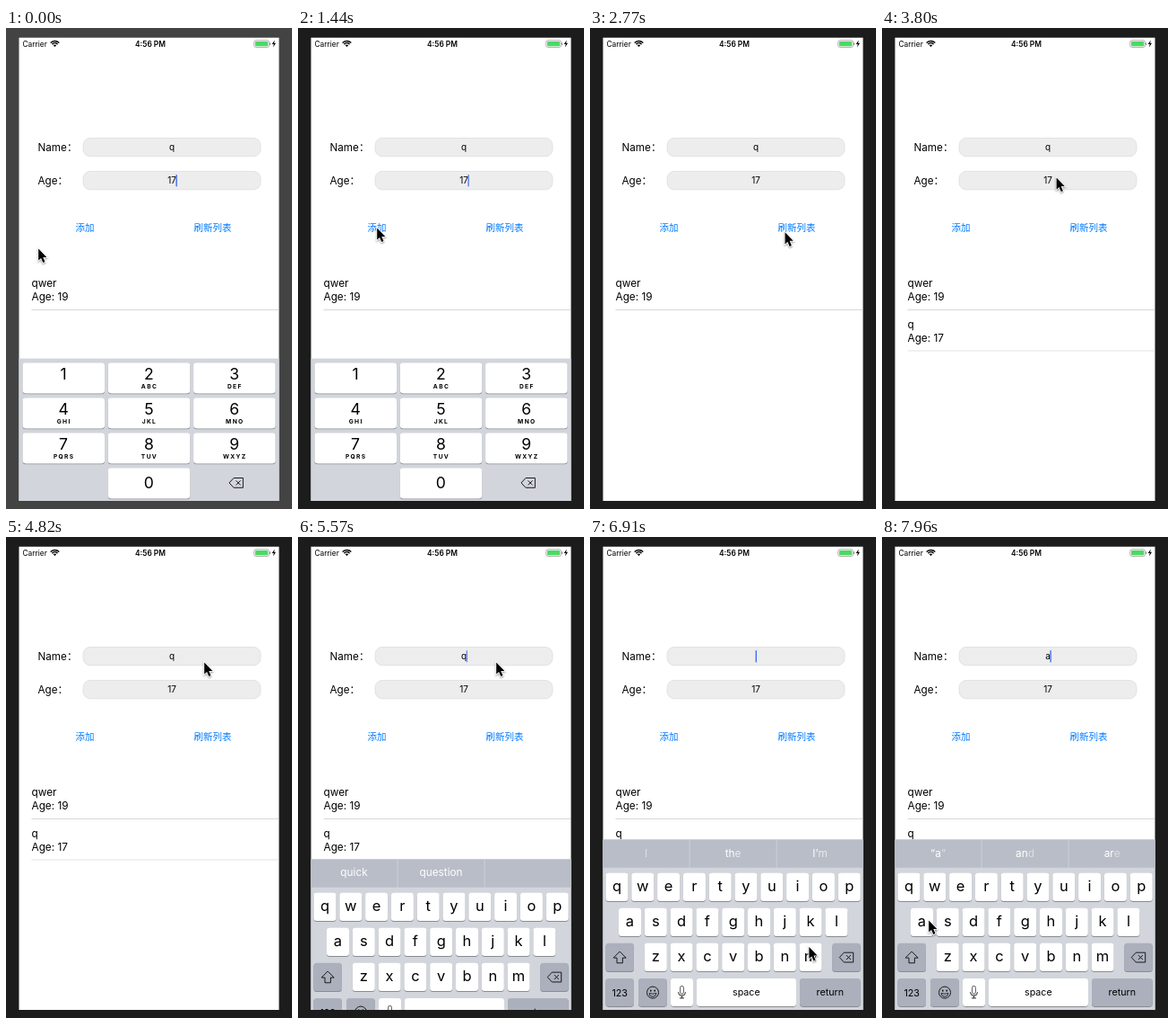
An HTML page with a canvas that plays this animation: 319x535 px, repeating every 8 s.

```html
<!DOCTYPE html>
<html lang="zh-CN">
<head>
<meta charset="utf-8">
<title>Form with list</title>
<style>
  html, body { margin: 0; width: 100%; height: 100%; overflow: hidden; background: #1c1c1c; }
  canvas { display: block; width: 319px; height: 535px; }
</style>
</head>
<body>
<canvas id="stage"></canvas>
<script>
const W = 319, H = 535, LOOP = 8000;
const canvas = document.getElementById('stage');
const dpr = window.devicePixelRatio || 1;
canvas.width = W * dpr;
canvas.height = H * dpr;
const ctx = canvas.getContext('2d');

const SANS = 'Inter, Roboto, sans-serif';
const CJK = '"Noto Sans CJK SC", "Noto Sans CJK", sans-serif';
const BLUE = '#007aff', KEY_GREY = '#abb0bc', SHADOW = '#898c91', BOARD = '#d2d5db';
const SCREEN = { x: 14.5, y: 10.8, w: 290, h: 515.2 };
const BOTTOM = SCREEN.y + SCREEN.h;
const PAD_TOP = 367.6, LETTERS_TOP = 336.5;

const clamp = v => Math.max(0, Math.min(1, v));
const easeOut = u => 1 - (1 - clamp(u)) ** 3;
const mix = (a, b, u) => a + (b - a) * u;

const BEATS = [0, 300, 1320, 1730, 2470, 3500, 4090, 4820, 5420, 5870, 6460, 6760, 7510, 7810, 7960, 8000];
function snap(t) {
  const i = BEATS.findLastIndex(b => b <= t);
  const start = BEATS[i], span = (BEATS[i + 1] ?? LOOP) - start;
  const step = span / Math.max(1, Math.round(span / 147));
  return start + Math.floor((t - start) / step + 1e-6) * step;
}

const POINTER = [
  [0, 36, 245], [200, 36, 245], [880, 88, 222], [2320, 88, 222], [2770, 219, 227],
  [3500, 219, 227], [3800, 194, 165], [4080, 206, 138], [4250, 206, 138], [4530, 205, 255],
  [4820, 221, 139], [5570, 221, 139], [5870, 267, 376], [6450, 280, 461], [6800, 280, 461],
  [7500, 52, 426], [8000, 52, 426]
];
function pointerAt(t) {
  const i = Math.max(1, POINTER.findIndex(p => p[0] > t));
  const [t0, x0, y0] = POINTER[i - 1], [t1, x1, y1] = POINTER[i];
  const u = clamp((t - t0) / (t1 - t0));
  return [mix(x0, x1, u), mix(y0, y1, u)];
}

function text(str, x, y, size, { color = '#000', align = 'left', weight = 400, font = SANS } = {}) {
  ctx.font = `${weight} ${size}px ${font}`;
  ctx.fillStyle = color;
  ctx.textAlign = align;
  ctx.fillText(str, x, y);
}

function box(x, y, w, h, r, fill, stroke) {
  ctx.beginPath();
  ctx.roundRect(x, y, w, h, r);
  if (fill) { ctx.fillStyle = fill; ctx.fill(); }
  if (stroke) { ctx.strokeStyle = stroke; ctx.lineWidth = 0.7; ctx.stroke(); }
}

function line(points, { color = '#111', width = 1, close = false, fill } = {}) {
  ctx.beginPath();
  points.forEach(([x, y]) => ctx.lineTo(x, y));
  if (close) ctx.closePath();
  if (fill) { ctx.fillStyle = fill; ctx.fill(); }
  if (width) { ctx.strokeStyle = color; ctx.lineWidth = width; ctx.stroke(); }
}

function arc(x, y, r, from, to, color = '#111', width = 1) {
  ctx.beginPath();
  ctx.arc(x, y, r, from, to);
  ctx.strokeStyle = color;
  ctx.lineWidth = width;
  ctx.stroke();
}

function at(x, y, draw) {
  ctx.save();
  ctx.translate(x, y);
  draw();
  ctx.restore();
}

// Full-width band; the screen clip trims its ends.
function band(y, h, color) {
  ctx.fillStyle = color;
  ctx.fillRect(0, y, W, h);
}

function statusBar() {
  text('Carrier', 18.5, 21, 8.4);
  text('4:56 PM', 161, 21, 8.4, { align: 'center', weight: 600 });
  at(54.5, 21, () => {
    for (const r of [6.6, 4.2]) arc(0, 0, r, -Math.PI * 0.76, -Math.PI * 0.24, '#000', 1.5);
    ctx.beginPath();
    ctx.moveTo(0, 0);
    ctx.arc(0, 0, 2.4, -Math.PI * 0.76, -Math.PI * 0.24);
    ctx.fillStyle = '#000';
    ctx.fill();
  });
  box(276.8, 13.8, 16.6, 7.6, 2, '#fff', '#8a8a8a');
  box(278, 15, 14.2, 5.2, 1, '#4cd964');
  box(294.2, 16.2, 1, 2.8, 0.5, '#8a8a8a');
  line([[299.8, 13.6], [296.6, 18], [298.7, 18], [298, 21.4], [301, 16.8], [299, 16.8]],
    { close: true, fill: '#000', width: 0 });
}

function field(label, value, y, caretAlpha) {
  text(label, 35.5, y + 15.2, 11.7);
  const labelWidth = ctx.measureText(label).width;
  text('：', 35.5 + labelWidth, y + 15, 11.5, { font: CJK });
  box(86, y + 0.4, 198, 20.4, 8, '#ededed', '#dadada');
  text(value, 185, y + 14.4, 10, { align: 'center' });
  if (caretAlpha > 0) {
    const x = 185 + ctx.measureText(value).width / 2;
    ctx.globalAlpha = caretAlpha;
    box(x - 0.4, y + 4, 1.4, 13.4, 0.7, '#426bf2');
    ctx.globalAlpha = 1;
  }
}

function row(name, age, top, lineColor) {
  text(name, 28.5, top + 20, 11.8);
  text('Age: ' + age, 28.5, top + 35.3, 11.8);
  ctx.fillStyle = lineColor;
  ctx.fillRect(28.5, top + 45, 276, 0.8);
}

function button(label, x, alpha) {
  ctx.globalAlpha = alpha;
  text(label, x, 226, 10.5, { color: BLUE, align: 'center', font: CJK });
  ctx.globalAlpha = 1;
}

function key(x, y, w, h, fill = '#fff') {
  box(x, y + 0.9, w, h, 3.3, SHADOW);
  box(x, y, w, h, 3.3, fill);
}

function deleteIcon(x, y) {
  at(x, y, () => {
    ctx.lineJoin = 'round';
    line([[-8, 0], [-3, -5.4], [7.4, -5.4], [7.4, 5.4], [-3, 5.4]], { close: true, width: 0.95 });
    line([[-0.4, -2.5], [4.6, 2.5]], { width: 0.95 });
    line([[4.6, -2.5], [-0.4, 2.5]], { width: 0.95 });
  });
}

function numberPad(top) {
  band(top, 160, BOARD);
  const letters = ['', 'ABC', 'DEF', 'GHI', 'JKL', 'MNO', 'PQRS', 'TUV', 'WXYZ'];
  letters.forEach((label, i) => {
    const x = 18.5 + (i % 3) * 95.3, y = top + 4.8 + Math.floor(i / 3) * 39;
    key(x, y, 91.5, 34);
    text(String(i + 1), x + 45.6, y + 18.2, 17.6, { align: 'center' });
    ctx.letterSpacing = '1.3px';
    text(label, x + 46.2, y + 28.6, 6.7, { align: 'center', weight: 700 });
    ctx.letterSpacing = '0px';
  });
  const y = top + 121.8;
  key(113.8, y, 91.5, 34);
  text('0', 159.4, y + 22.9, 17.6, { align: 'center' });
  deleteIcon(257, y + 16.5);
}

// Letters of each suggestion fade in one after another.
function suggestions(words, top, progress) {
  band(top, 31.3, '#b9bdc7');
  ctx.fillStyle = '#cdd0d7';
  for (const x of [110.6, 207.6]) ctx.fillRect(x, top, 1, 31.3);
  words.forEach((word, i) => {
    ctx.font = `400 11.8px ${SANS}`;
    const left = 62.5 + i * 97 - ctx.measureText(word).width / 2;
    const shown = progress * (word.length - 0.5);
    [...word].forEach((ch, j) => {
      ctx.globalAlpha = clamp(shown - j);
      text(ch, left + ctx.measureText(word.slice(0, j)).width, top + 19, 11.8, { color: '#fff' });
    });
  });
  ctx.globalAlpha = 1;
}

function letterKeys(top, deletePressed) {
  const rows = [['qwertyuiop', 17.5], ['asdfghjkl', 32], ['zxcvbnm', 60.8]];
  rows.forEach(([chars, left], r) => {
    const y = top + 37.3 + r * 39;
    [...chars].forEach((ch, i) => {
      const x = left + i * 28.8;
      key(x, y, 25, 31.3);
      text(ch, x + 12.5, y + 20.2, 16.5, { align: 'center' });
    });
  });

  const y3 = top + 115.3, y4 = top + 154.5;
  key(17.5, y3, 31.4, 31.3, KEY_GREY);
  line([[33.2, y3 + 9.2], [40.2, y3 + 16.3], [36.4, y3 + 16.3], [36.4, y3 + 22],
    [30, y3 + 22], [30, y3 + 16.3], [26.2, y3 + 16.3]], { close: true, width: 0.95 });
  key(270.3, y3, 31.4, 31.3, deletePressed ? '#fff' : KEY_GREY);
  deleteIcon(286.3, y3 + 15.8);

  key(17.5, y4, 31.4, 31, KEY_GREY);
  text('123', 33.2, y4 + 19.6, 10.8, { align: 'center' });
  key(54, y4, 31.8, 31, KEY_GREY);
  at(70, y4 + 15.6, () => {
    arc(0, 0, 6.5, 0, Math.PI * 2, '#111', 0.95);
    ctx.fillStyle = '#111';
    for (const x of [-2.2, 2.2]) {
      ctx.beginPath();
      ctx.ellipse(x, -2, 0.8, 1.2, 0, 0, Math.PI * 2);
      ctx.fill();
    }
    ctx.beginPath();
    ctx.arc(0, 0.8, 3.9, 0, Math.PI);
    ctx.quadraticCurveTo(0, 2.4, 3.9, 0.8);
    ctx.lineWidth = 0.8;
    ctx.stroke();
  });
  key(90, y4, 25, 31);
  at(102.5, y4 + 15.4, () => {
    box(-1.9, -7, 3.8, 8.8, 1.9, null, '#111');
    arc(0, -0.2, 4, 0, Math.PI, '#111', 0.9);
    line([[0, 3.8], [0, 6.5]], { width: 0.9 });
    line([[-2.4, 6.5], [2.4, 6.5]], { width: 0.9 });
  });
  key(119, y4, 111, 31);
  text('space', 174.3, y4 + 18.8, 10.7, { align: 'center' });
  key(234, y4, 67.7, 31, KEY_GREY);
  text('return', 267.8, y4 + 18.8, 10.7, { align: 'center' });
}

function letterBoard(t, top) {
  band(top, 190, BOARD);
  if (t < 6760) suggestions(['quick', 'question', ''], top, 2);
  else if (t < 7810) suggestions(['I', 'the', 'I’m'], top, (t - 6760) / 140);
  else suggestions(['“a”', 'and', 'are'], top, (t - 7810) / 150);
  letterKeys(top, t >= 6760 && t < 6900);
}

function pointer([x, y]) {
  at(x, y, () => {
    ctx.shadowColor = 'rgba(0,0,0,.35)';
    ctx.shadowBlur = 2 * dpr;
    ctx.shadowOffsetY = dpr;
    ctx.lineJoin = 'miter';
    const shape = [[0.2, 0.4], [0.2, 13.6], [3.1, 10.9], [5.3, 16], [7.5, 15.1], [5.3, 9.9], [9.4, 9.9]];
    line(shape, { close: true, color: '#fff', width: 1.8, fill: '#fff' });
    ctx.shadowColor = 'transparent';
    line(shape, { close: true, fill: '#000', width: 0 });
  });
}

// Dimmed from press to release, then fading back.
const pressAlpha = (t, down, up) => t < down ? 1 : clamp(0.2 + Math.max(0, t - up) / 340);

// Solid, then a short fade out and back, once a second.
function blink(t, start) {
  const phase = (t - start) % 1000;
  return phase < 500 ? 1 : phase < 640 ? 1 - (phase - 500) / 140 : phase < 860 ? 0 : clamp((phase - 860) / 100);
}

function nameCaret(t) {
  if (t < 5400) return 0;
  if (t < 6760) return t < 5600 ? 0.75 : blink(t, 5460);
  return blink(t, t < 7810 ? 6760 : 7810);
}

function draw(t) {
  ctx.setTransform(dpr, 0, 0, dpr, 0, 0);
  band(0, H, t < 1320 ? '#434343' : '#1c1c1c');

  ctx.save();
  ctx.beginPath();
  ctx.rect(SCREEN.x, SCREEN.y, SCREEN.w, SCREEN.h);
  ctx.clip();
  band(0, H, '#fff');

  statusBar();
  const name = t < 6760 ? 'q' : t < 7810 ? '' : 'a';
  field('Name', name, 122, nameCaret(t));
  field('Age', '17', 159, t < 1547 ? blink(t, -200) : 0);
  button('添加', 88, pressAlpha(t, 1450, 1550));
  button('刷新列表', 230.5, pressAlpha(t, 2900, 3060));
  row('qwer', 19, 268, '#cfced2');
  if (t >= 3060) row('q', 17, 313.6, '#dddde0');

  const hide = easeOut((t - 1547) / 400);
  if (hide < 1) numberPad(mix(PAD_TOP, BOTTOM, hide));
  const show = easeOut((t - 5365) / 400);
  if (show > 0) letterBoard(t, mix(BOTTOM, LETTERS_TOP, show));
  ctx.restore();

  pointer(pointerAt(t));
}

function tick(now) {
  draw(snap(now % LOOP));
  requestAnimationFrame(tick);
}
draw(0);
requestAnimationFrame(tick);
</script>
</body>
</html>
```
